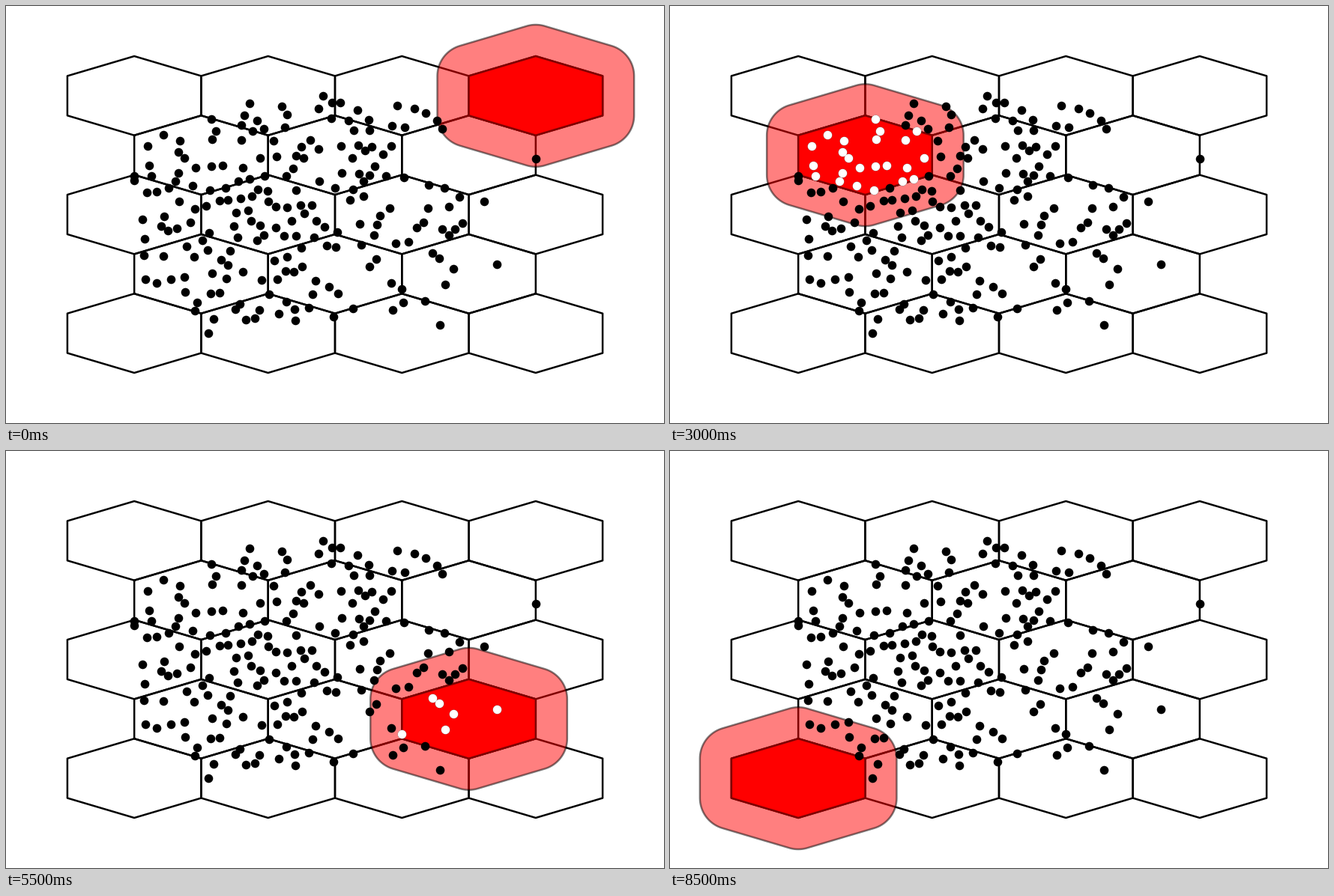
Recreate the animation shown at these times as a matplotlib script. Size 878 px wide and 557 px high, loop 9000 ms.

```python
import numpy as np
import matplotlib.pyplot as plt
from matplotlib.animation import FuncAnimation
from matplotlib.patches import Polygon
from matplotlib.path import Path

W, H, DPI = 878, 557, 64
PT = 72 / DPI  # points per pixel
CELL_W, CELL_H = 178.55, 105.75
LEFT = W / 2 - 2 * CELL_W  # the grid is centred on the stage
TOP = H / 2 - 2 * CELL_H
BUFFER = 42
DOT = 11.6
LINE = 2.5

# Number of scattered points in each cell
COUNTS = [
    [0, 10, 9, 0],
    [23, 28, 1],
    [12, 32, 23, 0],
    [22, 17, 4],
    [0, 13, 4, 0],
]
STRAYS = [(707, 204), (655, 344.5), (638, 261), (171.4, 227), (171.4, 233),
          (270, 437), (578.5, 426), (423, 119.5), (528.3, 378)]


def hexagon(row, col):
    cx = LEFT + CELL_W * (col + 0.5 + 0.5 * (row % 2))
    cy = TOP + CELL_H * (0.5 + 0.75 * row)
    dx = CELL_W / 2 * np.array([0, 1, 1, 0, -1, -1])
    dy = CELL_H / 4 * np.array([-2, -1, 1, 2, 1, -1])
    return np.column_stack([cx + dx, cy + dy])


def grow(poly, dist):
    """Outline at a fixed distance around a clockwise polygon, rounded corners."""
    edges = np.roll(poly, -1, axis=0) - poly
    out = np.arctan2(-edges[:, 0], edges[:, 1])
    parts = []
    for i, vertex in enumerate(poly):
        turn = (out[i] - out[i - 1]) % (2 * np.pi)
        a = out[i - 1] + np.linspace(0, turn, 20)
        parts.append(vertex + dist * np.column_stack([np.cos(a), np.sin(a)]))
    return np.vstack(parts)


def in_cloud(p):
    """The points fill a rounded box in the middle of the grid."""
    return ((p[0] - 395) / 218) ** 4 + ((p[1] - 275) / 148) ** 4 < 1


def scatter_points():
    rng = np.random.default_rng(7)
    pts = list(STRAYS)
    for row, counts in enumerate(COUNTS):
        for col, n in enumerate(counts):
            poly = hexagon(row, col)
            cell = Path(poly)
            goal, gap = len(pts) + n, 11.0
            while len(pts) < goal:
                p = rng.uniform(poly.min(axis=0), poly.max(axis=0))
                if not (in_cloud(p) and cell.contains_point(p)):
                    continue
                if np.hypot(*(np.array(pts) - p).T).min() > gap:
                    pts.append(tuple(p))
                else:
                    gap *= 0.99
    return np.array(pts)


# Cells are visited row by row, from right to left
cells = [hexagon(r, c) for r, counts in enumerate(COUNTS)
         for c in reversed(range(len(counts)))]
buffers = [grow(cell, BUFFER) for cell in cells]
points = scatter_points()
inside = [Path(cell).contains_points(points) for cell in cells]

fig = plt.figure(figsize=(W / DPI, H / DPI), dpi=DPI, facecolor="white")
ax = fig.add_axes([0, 0, 1, 1])
ax.set_xlim(0, W)
ax.set_ylim(H, 0)
ax.axis("off")

edge = dict(ec="black", lw=LINE * PT, joinstyle="round")
for cell in cells:
    ax.add_patch(Polygon(cell, fill=False, zorder=1, **edge))
active = ax.add_patch(Polygon(cells[0], fc="red", zorder=2, **edge))
halo = ax.add_patch(Polygon(buffers[0], fc="red", alpha=0.5, zorder=3, **edge))

dot = dict(marker="o", ls="none", ms=DOT * PT, mew=0, snap=False)
ax.plot(*points.T, color="black", zorder=4, **dot)
chosen, = ax.plot([], [], color="white", zorder=5, **dot)


def draw(i):
    active.set_xy(cells[i])
    halo.set_xy(buffers[i])
    chosen.set_data(*points[inside[i]].T)
    return active, halo, chosen


anim = FuncAnimation(fig, draw, frames=len(cells), interval=500,
                     repeat=True, repeat_delay=0)
plt.show()
```
